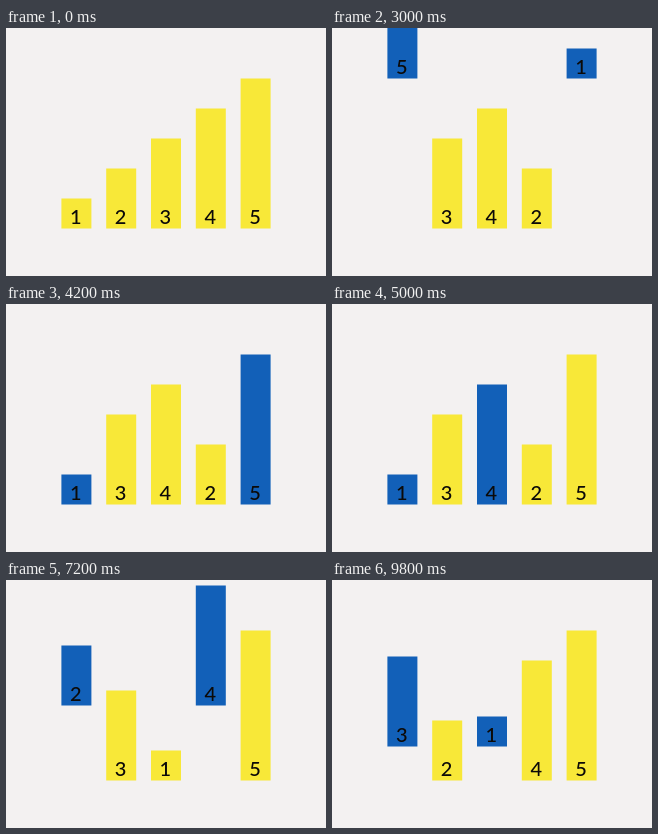
An HTML page with a canvas that plays this animation: 320x248 px, repeating every 10000 ms.

```html
<!DOCTYPE html>
<html lang="en">
<head>
<meta charset="utf-8">
<title>Heap sort</title>
<style>
  html, body { margin: 0; width: 320px; height: 248px; overflow: hidden; background: #f3f1f1; }
  canvas { display: block; }
</style>
</head>
<body>
<canvas id="stage" width="320" height="248"></canvas>
<script>
const ctx = document.getElementById('stage').getContext('2d');
const LOOP = 10000, TICK = 200, FLOOR = 200.5, PEAK = 150, RISE = 1000;

// Start time, bar order, highlighted values, and whether they trade places by air.
const steps = [
  [0, '12345', ''],
  [400, '53421', '32'],
  [820, '53421', '31'],
  [1240, '53421', '53'],
  [1660, '53421', '54'],
  [2000, '53421', '51', true],
  [4000, '13425', '15'],
  [4400, '13425', '13'],
  [4800, '13425', '14'],
  [5250, '43125', '41'],
  [5700, '43125', '42', true],
  [7700, '23145', '24'],
  [8100, '23145', '23'],
  [8550, '23145', '31'],
  [9050, '32145', '32'],
  [9573, '32145', '31', true]
];

function swap(order, [a, b]) {
  return order.replace(/./g, c => c === a ? b : c === b ? a : c);
}

function drawBar(value, slot, lift, active) {
  const x = 55.4 + slot * 44.8, height = value * 30, bottom = FLOOR - lift;
  ctx.fillStyle = active ? '#1260b8' : '#f8e838';
  ctx.fillRect(x, bottom - height, 30, height);
  ctx.fillStyle = '#0c0a08';
  ctx.fillText(value, x + 14.4, bottom - 4.5);
}

function draw(time) {
  const [start, before, active, flying] = steps.filter(step => step[0] <= time).pop();
  const phase = (time - start) / RISE;
  const order = flying && phase > 1 ? swap(before, active) : before;
  const lift = flying ? Math.round(PEAK * (1 - Math.abs(1 - phase))) : 0;

  ctx.fillStyle = '#f3f1f1';
  ctx.fillRect(0, 0, 320, 248);
  ctx.font = '500 20px Lato, sans-serif';
  ctx.textAlign = 'center';
  [...order].forEach((value, slot) => {
    const isActive = active.includes(value);
    drawBar(value, slot, isActive ? lift : 0, isActive);
  });
}

const origin = performance.now();
function frame() {
  const time = (performance.now() - origin) % LOOP;
  draw(Math.floor(time / TICK) * TICK);
  requestAnimationFrame(frame);
}
frame();
</script>
</body>
</html>
```
